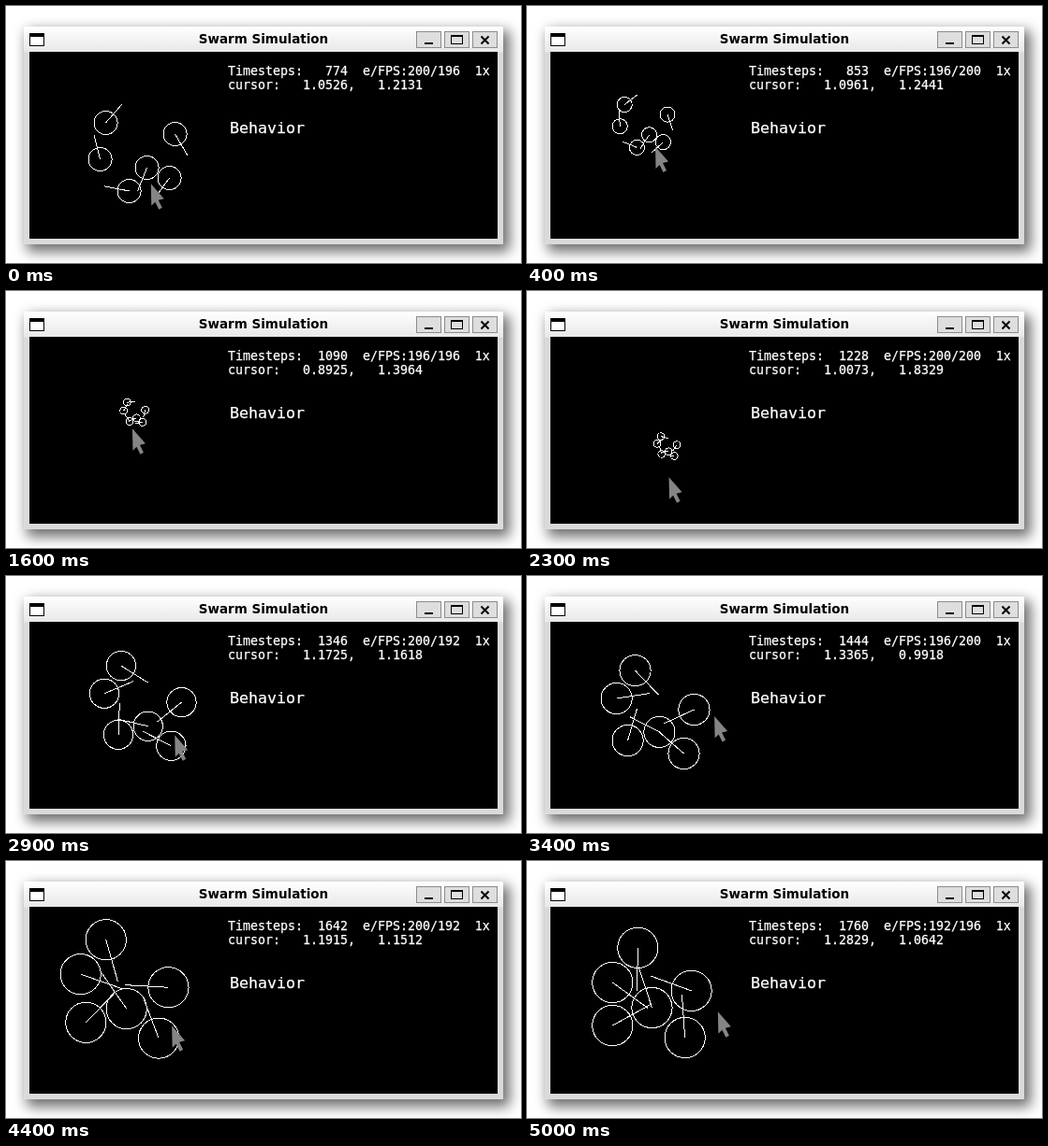
An HTML page that plays this animation: 550 by 275 pixels, repeating every 5100 ms.

```html
<!DOCTYPE html>
<html lang="en">
<head>
<meta charset="utf-8">
<title>Swarm Simulation</title>
<style>
  html, body { margin: 0; width: 100%; height: 100%; overflow: hidden; background: #fff; }
  #stage { position: relative; width: 550px; height: 275px; overflow: hidden; }
  #win {
    position: absolute; left: 19px; top: 22px; width: 512px; height: 233px;
    border-radius: 2px;
    background: linear-gradient(#fff, #e8e8e8 27px, #dadada 28px);
    box-shadow: 5px 6px 14px 2px rgba(0, 0, 0, .57);
  }
  svg { position: absolute; left: 0; top: 0; }
  .crisp { shape-rendering: crispEdges; }
  .title { font: bold 13.5px "DejaVu Sans", sans-serif; text-anchor: middle; }
  .mono {
    font: 13.29px "DejaVu Sans Mono", monospace;
    fill: #fff; stroke: #fff; stroke-width: .25; white-space: pre;
  }
  .mono.big { font-size: 16.6px; }
  #swarm { fill: none; stroke: #fff; stroke-width: 1; }
</style>
</head>
<body>
<div id="stage">
  <div id="win"></div>
  <svg width="550" height="275" viewBox="0 0 550 275">
    <clipPath id="view"><rect x="25" y="49" width="500" height="200"/></clipPath>
    <rect x="25" y="49" width="500" height="200"/>
    <g class="crisp">
      <rect x="25.5" y="29.5" width="15" height="13" fill="#fff" stroke="#000"/>
      <rect x="25" y="29" width="16" height="4"/>
      <g fill="#dedede" stroke="#8c8c8c">
        <rect x="438.5" y="27.5" width="26" height="17"/>
        <rect x="468.5" y="27.5" width="26" height="17"/>
        <rect x="498.5" y="27.5" width="26" height="17"/>
      </g>
      <rect x="447" y="39" width="9" height="2"/>
      <rect x="475.5" y="31.5" width="12" height="9" fill="none" stroke="#000"/>
      <rect x="475" y="31" width="13" height="2"/>
    </g>
    <path d="M507.500 32.500l8 8m0-8l-8 8" stroke="#000" stroke-width="2"/>
    <text class="title" x="275" y="40">Swarm Simulation</text>
    <g clip-path="url(#view)"><g id="swarm" class="crisp"></g></g>
    <text id="stats" class="mono" x="237" y="74"></text>
    <text id="coords" class="mono" x="237" y="89"></text>
    <text class="mono big" x="239" y="136">Behavior</text>
    <path id="cursor" d="M0 0L.5 23.500L4.500 19.500L8.500 27.500L12 25.500L8 17.500L14 16Z" fill="#858585"/>
  </svg>
</div>
<script>
const LOOP = 5100, TICK = 100, SPAN = 5000;
const TURN = 0.028;                                // degrees per ms
const RATE = 0.1972;                               // simulation steps per ms
const MID = 0.68;                                  // when agents pass their middle point
const ORIGIN = { x: 0.94, y: 1 }, AGENT_SIZE = 0.1; // swarm centre and radius in the world
const byId = id => document.getElementById(id);

// Camera drags and zooms: radius and centre on screen, cursor in the world
const stops = [
  { t: 0, r: 12.5, cx: 140.7, cy: 163.5, wx: 1.0526, wy: 1.2131 },
  { t: 800, r: 5.2, cx: 108.2, cy: 98.2, wx: 1.1396, wy: 1.2752 },
  { t: 1000, r: 4.6, cx: 62, cy: 61, wx: 1.14, wy: 1.28 },
  { t: 1600, r: 3.9, cx: 136.8, cy: 131.7, wx: 0.8925, wy: 1.3964 },
  { t: 2300, r: 3.8, cx: 149, cy: 167.7, wx: 1.0073, wy: 1.8329 },
  { t: 3000, r: 19.8, cx: 143, cy: 141, wx: 1.2, wy: 1.05 },
  { t: 3400, r: 16.6, cx: 134.3, cy: 151.3, wx: 1.3365, wy: 0.9918 },
  { t: 3900, r: 19, cx: 140, cy: 145, wx: 1.28, wy: 1.07 },
  { t: 4400, r: 21.6, cx: 122.8, cy: 143.5, wx: 1.1915, wy: 1.1512 },
  { t: 5000, r: 21.6, cx: 129.8, cy: 147.3, wx: 1.2829, wy: 1.0642 }
];

// Each agent: first heading, then start, middle and end around the swarm centre, in radii
const agents = [
  [-49, [-2.73, -3.08], [-1.13, -3.02], [-0.53, -2.52]],
  [256, [-3.21, 0.04], [-2.33, -1.22], [-1.78, -0.8]],
  [60, [3.19, -2.12], [2.66, -0.5], [2.12, -0.39]],
  [112, [0.79, 0.76], [0.43, 0.94], [0.17, 0.45]],
  [191, [-0.73, 2.76], [-1.61, 1.49], [-1.78, 1.33]],
  [126, [2.71, 1.64], [2, 2.33], [1.8, 1.93]]
].map(([heading, ...path]) => ({ heading, path, ring: add("circle"), ray: add("line") }));

function add(tag) {
  return byId("swarm").appendChild(document.createElementNS("http://www.w3.org/2000/svg", tag));
}
function set(el, attrs) {
  for (const k in attrs) el.setAttribute(k, attrs[k]);
}

// Parabola through three points at 0, MID and 1
function along([a, b, c], u) {
  const wa = (u - MID) * (u - 1) / MID;
  const wb = u * (1 - u) / (MID * (1 - MID));
  const wc = u * (u - MID) / (1 - MID);
  return a.map((v, i) => v * wa + b[i] * wb + c[i] * wc);
}

function camera(t) {
  const i = Math.max(1, stops.findIndex(s => s.t >= t));
  const a = stops[i - 1], b = stops[i], f = (t - a.t) / (b.t - a.t);
  const mix = k => a[k] + (b[k] - a[k]) * f;
  return { r: a.r * (b.r / a.r) ** f, cx: mix("cx"), cy: mix("cy"), wx: mix("wx"), wy: mix("wy") };
}

// Frame rate flickering around 196 in steps of 4
function fps(seed) {
  const noise = Math.abs(Math.sin(seed * 12.9898) * 43758.5453) % 1;
  return 196 + 4 * Math.round((noise - 0.5) * 2.4);
}

function draw(t) {
  const { r, cx, cy, wx, wy } = camera(t);
  for (const { heading, path, ring, ray } of agents) {
    const [px, py] = along(path, t / SPAN);
    const x = cx + px * r, y = cy + py * r;
    const a = (heading + TURN * t) * Math.PI / 180, len = 2.15 * r;
    set(ring, { cx: x, cy: y, r });
    set(ray, { x1: x, y1: y, x2: x + len * Math.cos(a), y2: y + len * Math.sin(a) });
  }
  const zoom = r / AGENT_SIZE;
  const tx = cx + (wx - ORIGIN.x) * zoom, ty = cy + (wy - ORIGIN.y) * zoom;
  set(byId("cursor"), { transform: `translate(${tx} ${ty})` });

  const steps = String(Math.round(774 + RATE * t)).padStart(6);
  const n = t / TICK;
  byId("stats").textContent = `Timesteps:${steps}  e/FPS:${fps(n + 1)}/${fps(n + 99)}  1x`;
  byId("coords").textContent = `cursor:   ${wx.toFixed(4)},   ${wy.toFixed(4)}`;
}

const start = performance.now();
function loop() {
  const t = (performance.now() - start) % LOOP;
  draw(Math.floor(t / TICK) * TICK);
  requestAnimationFrame(loop);
}
loop();
</script>
</body>
</html>
```
